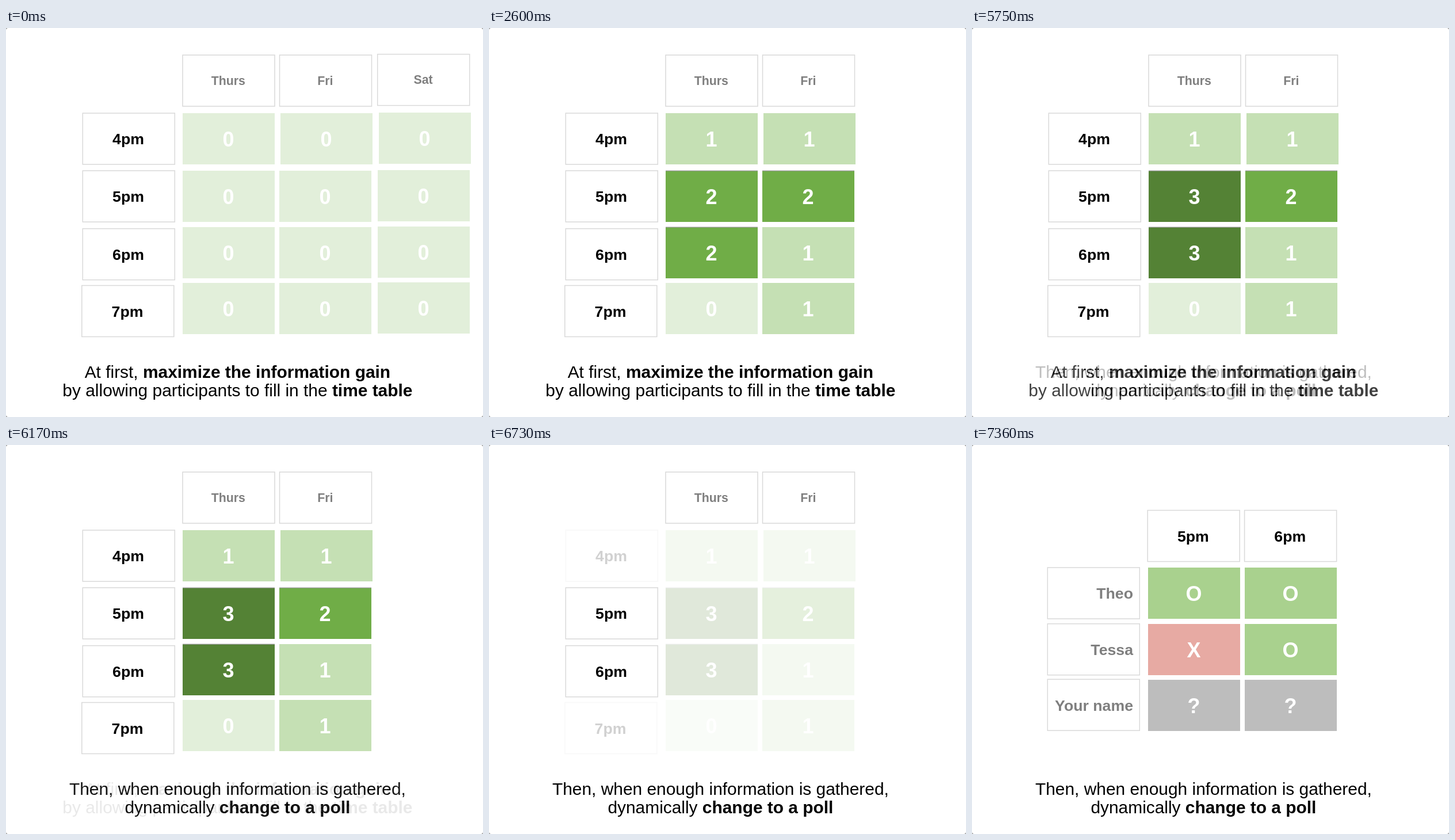
An HTML page with a canvas for the animation above (8 s loop, 829 px wide and 676 px high).

```html
<!DOCTYPE html>
<html lang="en">
<head>
<meta charset="utf-8">
<title>Time table to poll</title>
<style>
html, body { margin: 0; width: 100%; height: 100%; overflow: hidden; background: #fff; }
canvas { display: block; }
</style>
</head>
<body>
<canvas id="stage" width="829" height="676"></canvas>
<script>
const W = 829, H = 676, LOOP = 8000;
const FONT = '"Liberation Sans", Arial, sans-serif';
const GREY = '#7f7f7f', BORDER = '#d9d9d9';
const LEVELS = ['#e2efda', '#c5e0b4', '#70ad47', '#548235'];
const MARKS = { O: '#a9d18e', X: '#e7aaa3', '?': '#bdbdbd' };

const screen = document.getElementById('stage').getContext('2d');
const layer = new OffscreenCanvas(W, H).getContext('2d');

const clamp = x => Math.min(1, Math.max(0, x));
const lerp = (a, b, k) => a + (b - a) * k;
const smooth = x => x * x * (3 - 2 * x);

// Text centred vertically on its capitals.
function label(c, str, x, y, size, color, align = 'center') {
  c.font = `bold ${size}px ${FONT}`;
  c.textAlign = align;
  c.fillStyle = color;
  c.fillText(str, x, y + size * 0.344);
}

function frame(c, x, y) {
  c.fillStyle = '#fff';
  c.fillRect(x, y, 160, 89);
  c.strokeStyle = BORDER;
  c.lineWidth = 1.5;
  c.strokeRect(x, y, 160, 89);
}

function cell(c, x, y, str, color) {
  c.fillStyle = color;
  c.fillRect(x, y, 160, 89);
  label(c, str, x + 79.5, y + 45.5, 36, '#fff');
}

function timeBox(c, str, x, y) {
  frame(c, x, y);
  label(c, str, x + 79.2, y + 45.3, 26.7, '#000');
}

// Each line is a list of [text, weight] runs, centred together.
function caption(c, lines) {
  c.textAlign = 'left';
  c.fillStyle = '#000';
  lines.forEach((runs, i) => {
    const setFont = w => { c.font = `${w} 29.9px ${FONT}`; };
    const widths = runs.map(([str, w]) => (setFont(w), c.measureText(str).width));
    let x = 402.4 - widths.reduce((a, b) => a + b) / 2;
    runs.forEach(([str, w], k) => {
      setFont(w);
      c.fillText(str, x, 608.3 + i * 32);
      x += widths[k];
    });
  });
}

const first = c => caption(c, [
  [['At first, ', 'normal'], ['maximize the information gain', 'bold']],
  [['by allowing participants to fill in the ', 'normal'], ['time table', 'bold']]
]);
const then = c => caption(c, [
  [['Then, when enough information is gathered,', 'normal']],
  [['dynamically ', 'normal'], ['change to a poll', 'bold']]
]);

function headers(c, count) {
  ['Thurs', 'Fri', 'Sat'].slice(0, count).forEach((day, i) => {
    const x = [307, 475.5, 645.7][i], y = i === 2 ? 45.6 : 47;
    frame(c, x, y);
    label(c, day, x + 79.3, y + 44.3, 21.3, GREY);
  });
}

// The two times that stay and become the poll's columns.
function keptTimes(c, t) {
  const k = smooth(clamp((t - 6735) / 625));
  timeBox(c, '5pm', lerp(133.3, 305.2, k), lerp(248, 113.5, k));
  timeBox(c, '6pm', lerp(133.3, 473.6, k), lerp(348.7, 113.5, k));
}

function table(rows, text) {
  return (c, t) => {
    headers(c, rows[0].length);
    timeBox(c, '4pm', 133.3, 148);
    timeBox(c, '7pm', 131.8, 447.5);
    rows.forEach((row, r) => [...row].forEach((n, i) => {
      const x = [307, 475, 646][i] + (i && r === 0 ? 2 : 0);
      const y = [148, 248, 346, 443][r] - (i === 2 ? 1 : 0);
      cell(c, x, y, n, LEVELS[n]);
      if (n > 1) {
        c.fillStyle = 'rgba(150,150,150,.8)';
        c.fillRect(x, y - 0.5, 160, 1.5);
      }
    }));
    keptTimes(c, t);
    text(c);
  };
}

function daysOnly(c, t) {
  headers(c, 2);
  keptTimes(c, t);
  then(c);
}

function poll(c, t) {
  [['Theo', 'OO'], ['Tessa', 'XO'], ['Your name', '??']].forEach(([name, votes], r) => {
    const y = [213, 311, 408][r], top = [213, 310.7, 407.2][r];
    frame(c, 131.3, top);
    label(c, name, 280, top + 45.2, 26.7, GREY, 'right');
    [...votes].forEach((v, i) => cell(c, 306 + 168 * i, y, v, MARKS[v]));
  });
  keptTimes(c, t);
  then(c);
}

const finalRows = ['11', '32', '31', '01'];
// [start, duration, picture]: each fades in over the previous one.
const scenes = [
  [-1, 1, table(['000', '000', '000', '000'], first)],
  [445, 620, table(['110', '110', '110', '010'], first)],
  [1932, 655, table(['11', '22', '21', '01'], first)],
  [3835, 680, table(finalRows, first)],
  [5592, 635, table(finalRows, then)],
  [6210, 635, daysOnly],
  [6735, 625, poll]
];

function draw(t) {
  for (const [start, span, paint] of scenes) {
    const a = clamp((t - start) / span);
    if (!a) continue;
    layer.fillStyle = '#fff';
    layer.fillRect(0, 0, W, H);
    paint(layer, t);
    screen.globalAlpha = a;
    screen.drawImage(layer.canvas, 0, 0);
  }
  screen.globalAlpha = 1;
  // Rounded window corners.
  screen.fillStyle = '#8a8a8a';
  screen.beginPath();
  screen.rect(0, 0, W, H);
  screen.roundRect(0, 0, W, H, 4);
  screen.fill('evenodd');
}

const begin = performance.now();
function tick() {
  draw((performance.now() - begin) % LOOP);
  requestAnimationFrame(tick);
}
tick();
</script>
</body>
</html>
```
